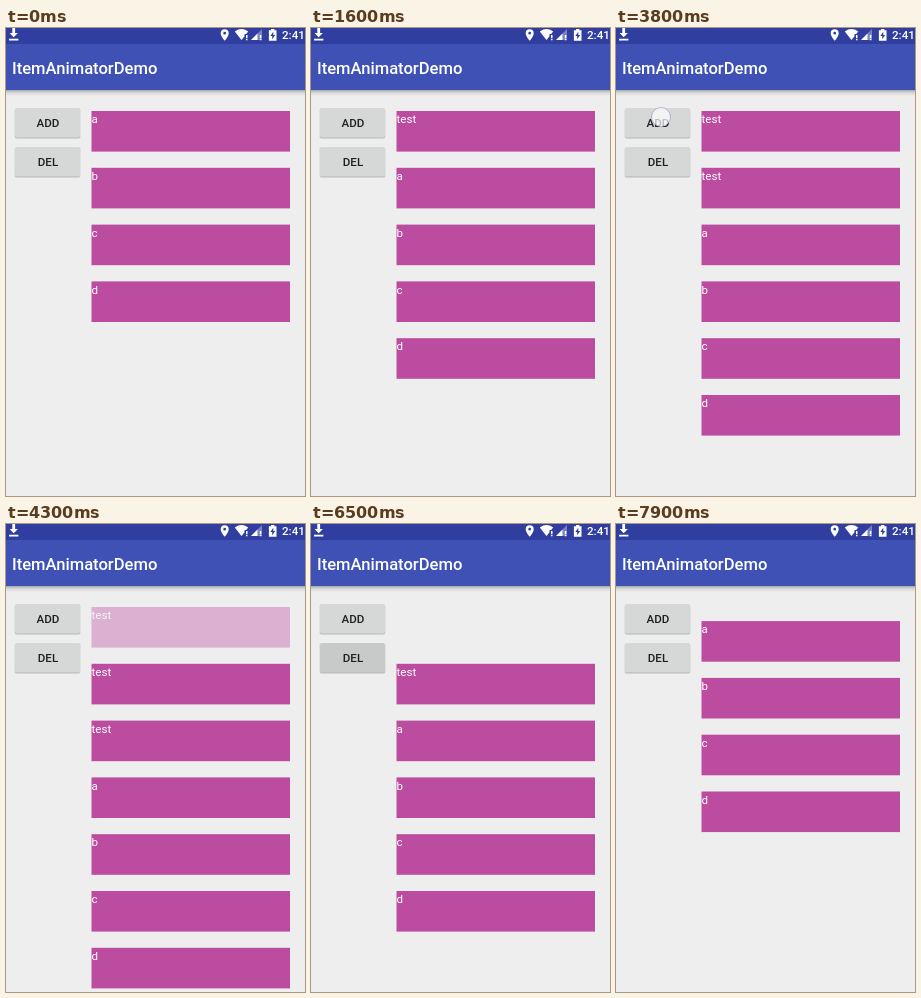
Write an HTML page that moves like this. It is 299 by 468 pixels and loops after 8 s.

```html
<!DOCTYPE html>
<html lang="en">
<head>
<meta charset="utf-8">
<title>ItemAnimatorDemo</title>
<style>
  html, body { margin: 0; width: 100%; height: 100%; overflow: hidden; background: #eee; }
  svg { display: block; font: 11.6px Roboto, sans-serif; }
  .medium { font-weight: 500; }
  .button text { font-weight: 500; text-anchor: middle; fill: #1f1f1f; }
</style>
</head>
<body>
<svg width="299" height="468" viewBox="0 0 299 468">
  <defs>
    <linearGradient id="shade" x2="0" y2="1">
      <stop stop-color="#000" stop-opacity=".3"/>
      <stop offset=".4" stop-color="#000" stop-opacity=".11"/>
      <stop offset="1" stop-color="#000" stop-opacity="0"/>
    </linearGradient>
  </defs>
  <rect width="299" height="468" fill="#eee"/>
  <rect y="62" width="299" height="6" fill="url(#shade)"/>
  <rect y="16" width="299" height="46" fill="#3f51b5"/>
  <rect width="299" height="16" fill="#303f9f"/>
  <text class="medium" x="6" y="46" font-size="16.6" fill="#fff">ItemAnimatorDemo</text>

  <g id="status" fill="#fff">
    <path d="M6.3 0h2.8v5h2.7L7.7 9.3 3.6 5h2.7zM3 10.8h9.4v1.6H3z"/>
    <path fill-rule="evenodd" d="M218.7 1.2a4 4 0 0 1 4 4c0 3-4 7.5-4 7.5s-4-4.500-4-7.500a4 4 0 0 1 4-4zm0 2.600a1.400 1.400 0 1 0 0 2.800 1.400 1.400 0 0 0 0-2.800z"/>
    <path d="M228.800 3.500q6.700-4.800 13.400 0l-2 2.500h-1.700v2.200l-3 3.800z"/>
    <path d="M240 7h1.500v3H240zm0 3.800h1.500v1.400H240z"/>
    <path opacity=".35" d="M256 1v11h-11z"/>
    <path d="M251.500 5.500V12H245zM253.800 7h1.500v3h-1.500zm0 3.800h1.500v1.400h-1.500z"/>
    <path d="M265 1h3.400v1.200h2.100v10.500h-7.600V2.200h2.100z"/>
    <path fill="#303f9f" d="M267.300 3.800l-3 4.200h1.900v3.200l3-4.300h-1.900z"/>
    <text class="medium" x="276" y="11">2:41</text>
  </g>
  <g id="buttons"></g>
  <g id="list"></g>
  <circle id="touch" r="9.500" fill="#fff" fill-opacity=".7" stroke="#7982b8" stroke-opacity=".5"/>
</svg>
<script>
const LOOP = 8000, STEP = 100, TOP = 83, PITCH = 56.8;
const MOVE = 250, FADE_IN = 80, FADE_OUT = 120;
const labels = ["test", "test", "test", "a", "b", "c", "d"];

// Insertions move the list, then fade the row in; removals do the reverse.
const add = (down, up, move) => ({ button: 0, down, up, move, fade: move + MOVE });
const del = (down, fade) => ({ button: 1, down, up: fade, move: fade + FADE_OUT, fade });
const adds = [add(1000, 1190, 1200), add(2300, 2460, 2468), add(3800, 4010, 4020)];
const dels = [del(5200, 5416), del(6200, 6380), del(7400, 7613)];
const taps = [...adds, ...dels];

const ramp = (t, start, length) => Math.min(1, Math.max(0, (t - start) / length));
const ease = x => (1 - Math.cos(Math.PI * x)) / 2;
const moved = (t, events) => events.reduce((sum, e) => sum + ease(ramp(t, e.move, MOVE)), 0);

function node(parent, tag, attrs = {}, text = "") {
  const el = document.createElementNS("http://www.w3.org/2000/svg", tag);
  for (const key in attrs) el.setAttribute(key, attrs[key]);
  el.textContent = text;
  return parent.appendChild(el);
}

const buttonLayer = document.getElementById("buttons");
const ripples = ["ADD", "DEL"].map((label, i) => {
  const g = node(buttonLayer, "g", { class: "button", transform: `translate(9 ${80 + i * 39})` });
  const box = { width: 65, height: 29.5, rx: 1.700 };
  node(g, "rect", { ...box, x: -.5, width: 66, y: .7, height: 30, fill: "#000", "fill-opacity": .1 });
  node(g, "rect", { ...box, y: .8, fill: "#b5b6b6" });
  node(g, "rect", { ...box, fill: "#d6d7d7" });
  const ripple = node(g, "rect", { ...box, fill: "#000" });
  node(g, "text", { x: 33, y: 19 }, label);
  return ripple;
});

const list = document.getElementById("list");
const rows = labels.map(label => {
  const g = node(list, "g");
  node(g, "rect", { x: 85.500, width: 198.500, height: 40.600, fill: "#bc4c9f" });
  node(g, "text", { x: 85.500, y: 12.300, fill: "#fff" }, label);
  return g;
});
const touch = document.getElementById("touch");

function draw(t) {
  const shift = moved(t, adds) - moved(t, dels);
  rows.forEach((row, i) => {
    let alpha = 1;
    if (i < 3) {
      const shown = ramp(t, adds[2 - i].fade, FADE_IN);
      alpha = shown - ramp(t, dels[i].fade, FADE_OUT);
    }
    row.setAttribute("transform", `translate(0 ${TOP + PITCH * (i - 3 + shift)})`);
    row.setAttribute("opacity", alpha);
  });

  ripples.forEach((ripple, i) => {
    const tap = taps.find(e => e.button === i && t >= e.down + 100 && t < e.up + 280);
    ripple.setAttribute("opacity", tap ? .065 * (1 - ramp(t, tap.up + 120, 160)) : 0);
  });

  const held = taps.find(e => t >= e.down && t < e.up);
  touch.setAttribute("opacity", held ? 1 : 0);
  if (held) touch.setAttribute("transform", held.button ? "translate(43 131)" : "translate(45 89)");
}

const start = performance.now();
function tick() {
  const t = (performance.now() - start) % LOOP;
  draw(Math.floor(t / STEP) * STEP);
  requestAnimationFrame(tick);
}
tick();
</script>
</body>
</html>
```
